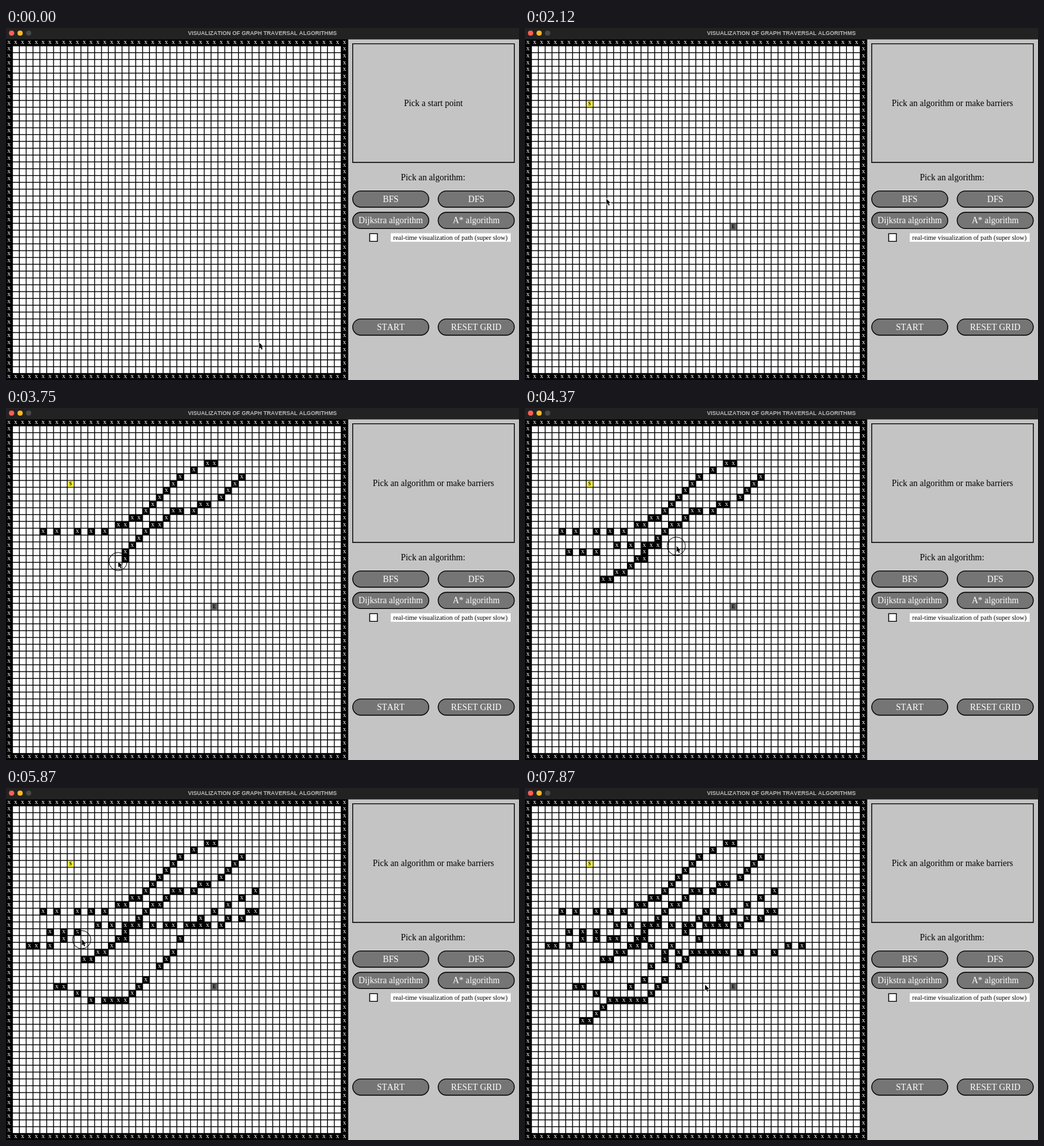
These frames come from a looping animation (800 px wide and 550 px high, 8 s). An HTML page with a canvas:

```html
<!DOCTYPE html>
<html lang="en">
<head>
<meta charset="utf-8">
<title>Graph traversal</title>
<style>
  html, body { margin: 0; width: 100%; height: 100%; overflow: hidden; background: #c4c4c4; }
  canvas { display: block; width: 800px; height: 550px; }
</style>
</head>
<body>
<canvas id="stage"></canvas>
<script>
const LOOP = 8000, COUNT = 50, LEFT = -.6, TOP = 17.2, PANEL = 533.4;
const CELL = (PANEL - LEFT) / COUNT, ROW = 32 / 3;
const SERIF = '"Liberation Serif", "Times New Roman", serif';
const SANS = '"Liberation Sans", Arial, sans-serif';
const START = [9, 9], END = [30, 27];
const START_STEP = 10, END_STEP = 15;

const canvas = document.getElementById('stage');
const ratio = window.devicePixelRatio || 1;
canvas.width = 800 * ratio;
canvas.height = 550 * ratio;
const screen2d = canvas.getContext('2d');
let ctx = screen2d;

const mix = (a, b, k) => a.map((v, i) => v + (b[i] - v) * k);
const centre = ([col, row]) => [LEFT + (col + .5) * CELL, TOP + (row + .5) * ROW];

// Catmull-Rom curve through points that are evenly spaced in time
function curve(points, u) {
  const last = points.length - 1;
  const i = Math.min(Math.floor(u * last), Math.max(0, last - 1));
  const t = u * last - i;
  const [a, b, c, d] = [-1, 0, 1, 2].map(k => points[Math.max(0, Math.min(last, i + k))]);
  return b.map((v, j) => v + t / 2 * (c[j] - a[j]
    + t * (2 * a[j] - 5 * v + 4 * c[j] - d[j] + t * (3 * (v - c[j]) + d[j] - a[j]))));
}

// The mouse: each gesture runs between two steps along a path in grid units;
// the cursor glides from one gesture to the next.
const gestures = [];
function gesture(from, to, path, pressed, count = 0) {
  const points = path.split(' ').map(pair => pair.split(',').map(Number));
  const cells = Array.from({ length: count },
    (_, i) => curve(points, i / (count - 1)).map(Math.round));
  gestures.push({ from, to, points, pressed, cells });
}
const hover = (from, to, path) => gesture(from, to, path, false);
const press = (from, to, path) => gesture(from, to, path, true);
const paint = (from, to, count, path) => gesture(from, to, path, true, count);

hover(0, 3, '36.5,43.9 23.3,32.4');
hover(4, 4, '23.3,32.4');
hover(8, 9, '9,8.9');
press(10, 11, '9,8.9');
press(14, 15, '29.8,27.2');
hover(16, 17, '29.7,26.8 11.4,22.8');
paint(18, 24.6, 18, '5,16 13,15.7 18,14.4 21,11.9 24.5,8.4 30,6');
paint(26.6, 31, 23, '34,8 28.7,11.9 23.2,13.8 18.8,17.2 15.4,20.7 11,23');
paint(33, 37.6, 18, '6,19 16,18.2 23.5,18 30.5,18 36,16');
paint(38.7, 44, 21, '36,13 28,17 23,23 18,28 14,29 7,27');
paint(46, 51, 22, '3,21.2 10.6,20 17,21.3 25.6,22 30.6,22.2 40,21');
paint(53.4, 57.4, 13, '26,16 21,21 17,25.8 11,30 8,32');
hover(58, 63, '13,26.5 25.8,26.6');

const progress = (g, step) => Math.min(1, (step - g.from) / (g.to - g.from || 1));

function text(str, x, y, size, color, family = SERIF, weight = 'normal') {
  ctx.font = `${weight} ${size}px ${family}`;
  ctx.fontKerning = 'none';
  ctx.textAlign = 'center';
  ctx.fillStyle = color;
  ctx.fillText(str, x, y);
}

// Outlined box whose border lies inside its bounds
function box(x, y, w, h, fill, radius = 0) {
  const line = 4 / 3;
  ctx.beginPath();
  ctx.roundRect(x + line / 2, y + line / 2, w - line, h - line, radius);
  ctx.fillStyle = fill;
  ctx.fill();
  ctx.strokeStyle = '#000';
  ctx.lineWidth = line;
  ctx.stroke();
}

function dot(x, y, r, fill) {
  ctx.beginPath();
  ctx.arc(x, y, r, 0, 7);
  ctx.fillStyle = fill;
  ctx.fill();
}

function cell(pos, fill, gap = 4 / 3) {
  const [x, y] = centre(pos);
  ctx.fillStyle = fill;
  ctx.fillRect(x - (CELL - gap) / 2, y - (ROW - gap) / 2, CELL - gap, ROW - gap);
}

function mark(pos, letter, size, color, weight) {
  const [x, y] = centre(pos);
  text(letter, x - .2, y + 2.2, size, color, SERIF, weight);
}

function barrier(pos) {
  cell(pos, '#000', 0);
  mark(pos, 'x', 10.4, '#fff');
}

function endpoint(pos, letter, fill) {
  cell(pos, fill);
  mark(pos, letter, 7.2, '#000', 'bold');
}

function button(label, column, y) {
  const x = 540 + column * 400 / 3;
  box(x, y, 120, 80 / 3, '#757575', 13);
  text(label, x + 60, y + 17.7, 13.65, '#fff');
}

function drawWindow() {
  ctx.fillStyle = '#c4c4c4';
  ctx.fillRect(0, 0, 800, 550);
  ctx.fillStyle = '#000';
  ctx.fillRect(0, TOP, PANEL, 550);
  for (let row = 0; row < COUNT; row++) {
    for (let col = 0; col < COUNT; col++) {
      const edge = Math.min(row, col) === 0 || Math.max(row, col) === COUNT - 1;
      edge ? barrier([col, row]) : cell([col, row], '#fff');
    }
  }
  ctx.fillStyle = '#222';
  ctx.fillRect(0, 0, 800, 17.8);
  ['#fe5f57', '#fdb827', '#484848'].forEach((fill, i) => dot(8.7 + i * 13.3, 8, 4.1, fill));
  text('VISUALIZATION OF GRAPH TRAVERSAL ALGORITHMS', 399.7, 11, 8.72, '#b8b8b8', SANS, 'bold');

  box(540, 24, 760 / 3, 560 / 3, '#c4c4c4');
  text('Pick an algorithm:', 666, 238, 13.6, '#000');
  [['BFS', 'DFS'], ['Dijkstra algorithm', 'A* algorithm']].forEach((labels, row) =>
    labels.forEach((label, column) => button(label, column, 254 + row * 100 / 3)));
  button('START', 0, 454);
  button('RESET GRID', 1, 454);
  box(566.5, 320.7, 40 / 3, 40 / 3, '#fff');
  ctx.fillStyle = '#fff';
  ctx.fillRect(600, 320.7, 187, 40 / 3);
  text('real-time visualization of path (super slow)', 693, 330.7, 10.35, '#000');
}

function drawCursor([x, y], pressed) {
  if (pressed) {
    ctx.beginPath();
    ctx.arc(x - .4, y, 14.2, 0, 7);
    ctx.strokeStyle = '#000';
    ctx.lineWidth = 1;
    ctx.stroke();
  }
  ctx.save();
  ctx.translate(x, y);
  const arrow = new Path2D('M0 0V9.2L2 7.3 3.4 10.7 5 10 3.6 6.7H6.4Z');
  ctx.strokeStyle = '#fff';
  ctx.lineWidth = 1.2;
  ctx.stroke(arrow);
  ctx.fillStyle = '#000';
  ctx.fill(arrow);
  ctx.restore();
}

function prompt(step) {
  if (step < START_STEP) return 'Pick a start point';
  return step < END_STEP ? 'Pick an end point' : 'Pick an algorithm or make barriers';
}

function drawMouse(step) {
  const index = gestures.findLastIndex(g => g.from <= step);
  const now = gestures[index], next = gestures[index + 1];
  let at = curve(now.points, progress(now, step));
  if (step > now.to && next) at = mix(at, next.points[0], (step - now.to) / (next.from - now.to));
  const [x, y] = centre(at);
  drawCursor([x + .5, y + 1], now.pressed && step <= now.to);
}

const backdrop = document.createElement('canvas');
backdrop.width = canvas.width;
backdrop.height = canvas.height;
ctx = backdrop.getContext('2d');
ctx.scale(ratio, ratio);
drawWindow();
ctx = screen2d;
ctx.scale(ratio, ratio);

function draw(step) {
  ctx.drawImage(backdrop, 0, 0, 800, 550);
  text(prompt(step), 666.5, 121.5, 13.6, '#000');
  if (step >= START_STEP) endpoint(START, 'S', '#f8f032');
  if (step >= END_STEP) endpoint(END, 'E', '#646464');
  for (const g of gestures.filter(g => g.from <= step)) {
    // Cells fill in slightly behind the cursor during a drag
    const lag = step <= g.to ? .7 : 0;
    const reached = Math.floor(progress(g, step) * (g.cells.length - 1) - lag);
    g.cells.slice(0, Math.max(0, reached + 1)).forEach(barrier);
  }
  drawMouse(step);
}

function tick() {
  const t = performance.now() % LOOP;
  draw(Math.floor(t / 250) * 2 + (t % 250 >= 120 ? 1 : 0));
  requestAnimationFrame(tick);
}
tick();
</script>
</body>
</html>
```
